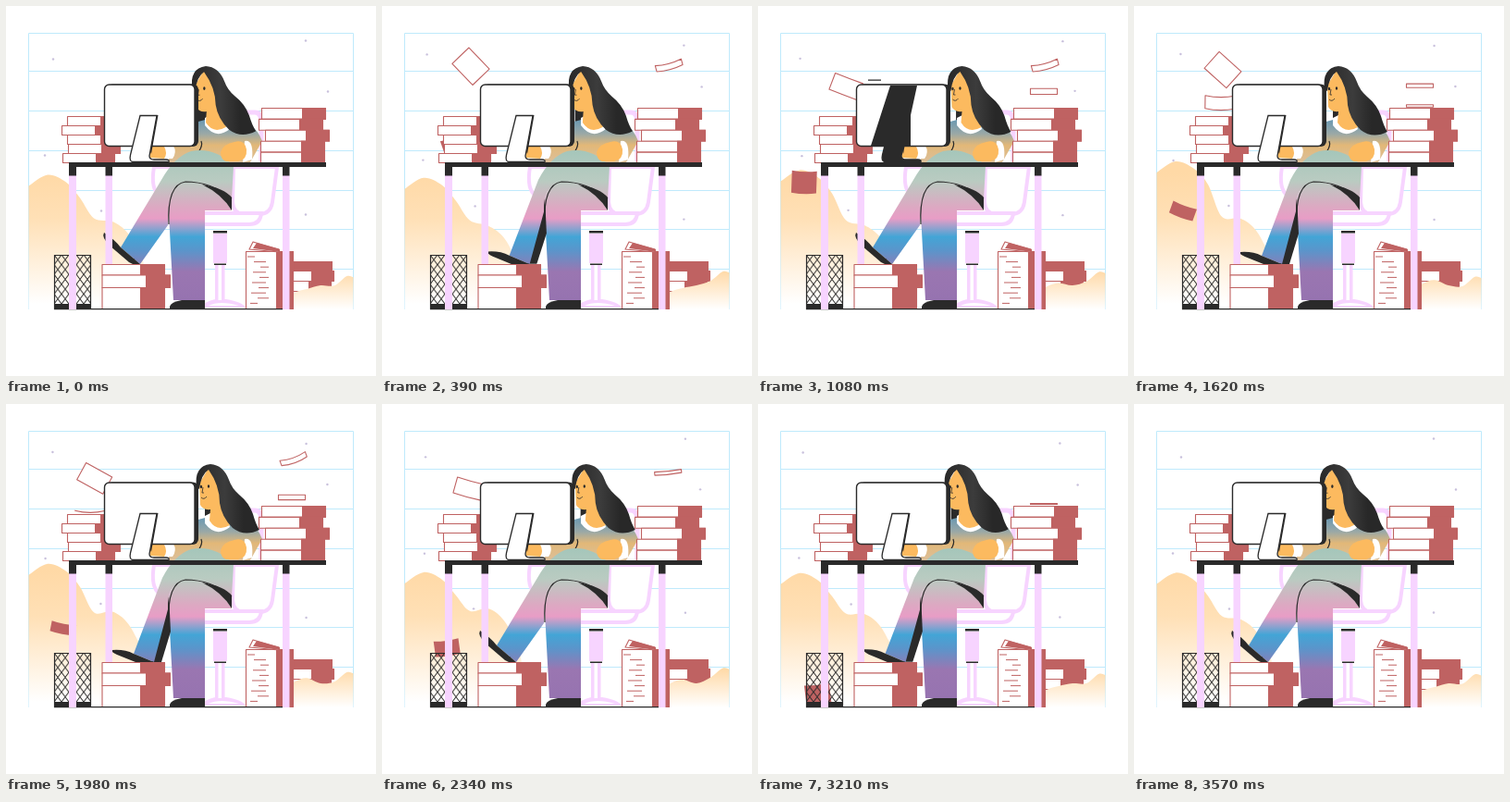
These frames come from a looping animation (400 by 400 pixels, 3600 ms). An HTML page:

```html
<!DOCTYPE html>
<html lang="en">
<head>
<meta charset="utf-8">
<title>Desk work</title>
<style>
html, body { margin: 0; width: 100%; height: 100%; overflow: hidden; background: #fff; }
svg { display: block; width: 100vw; height: 100vh; }
.line { fill: none; stroke: #bfeafc; }
.ink { fill: #2a2a2a; }
.inkline { fill: none; stroke: #2a2a2a; stroke-width: 1.2; }
.red { fill: #bf6262; }
.sheet { fill: #fff; stroke: #bf6262; stroke-width: 1.1; stroke-linejoin: round; }
.pink { fill: #f7d4ff; }
.tube { fill: #fff; stroke: #f7d4ff; stroke-width: 4; }
.skin { fill: #fcba5f; }
.white { fill: #fff; }
</style>
</head>
<body>
<svg viewBox="0 0 400 400">
  <defs>
    <linearGradient id="sand" gradientUnits="userSpaceOnUse" x1="0" y1="180" x2="0" y2="322">
      <stop offset="0" stop-color="#ffd9a6"/><stop offset=".35" stop-color="#ffe0b6"/><stop offset="1" stop-color="#fff"/>
    </linearGradient>
    <linearGradient id="sand2" gradientUnits="userSpaceOnUse" x1="0" y1="286" x2="0" y2="328">
      <stop offset="0" stop-color="#ffd9a6"/><stop offset="1" stop-color="#fff"/>
    </linearGradient>
    <linearGradient id="jeans" gradientUnits="userSpaceOnUse" x1="0" y1="156" x2="0" y2="320">
      <stop offset="0" stop-color="#a5c6ba"/><stop offset=".2" stop-color="#b9cbc1"/>
      <stop offset=".37" stop-color="#dca9c2"/><stop offset=".45" stop-color="#e89dc6"/>
      <stop offset=".57" stop-color="#43a5d6"/><stop offset=".66" stop-color="#5a95cb"/>
      <stop offset=".8" stop-color="#9a76b1"/><stop offset="1" stop-color="#9673b0"/>
    </linearGradient>
    <linearGradient id="shirt" gradientUnits="userSpaceOnUse" x1="0" y1="122" x2="0" y2="168">
      <stop offset="0" stop-color="#6798b4"/><stop offset=".35" stop-color="#9aa8a6"/>
      <stop offset=".62" stop-color="#e2b878"/><stop offset="1" stop-color="#dcbf98"/>
    </linearGradient>
    <linearGradient id="hair">
      <stop offset="0" stop-color="#282828"/><stop offset=".45" stop-color="#3c3c3c"/><stop offset=".75" stop-color="#282828"/>
    </linearGradient>
    <pattern id="mesh" patternUnits="userSpaceOnUse" x="52" y="269" width="8" height="10.6">
      <path class="inkline" style="stroke-width:1" d="M0 0 8 10.600M8 0 0 10.600"/>
    </pattern>
    <clipPath id="air"><rect width="400" height="326"/></clipPath>
  </defs>

  <path class="line" d="M24.500 328V29.500H375.500V328M24 70.500H376M24 113.500H376M24 156.500H376M24 199.500H376M24 241.500H376M24 284.500H376"/>
  <path id="hillL" fill="url(#sand)"/>
  <g id="dots" fill="#c8c0dc"></g>
  <g id="backBooks"></g>
  <path id="hillR" fill="url(#sand2)"/>
  <g id="papers" clip-path="url(#air)"></g>
  <g id="deskBooks"></g>

  <!-- chair -->
  <path d="M255 115H269Q276 115 276 126V168" fill="none" stroke="#f7d4ff" stroke-width="5"/>
  <path class="tube" d="M160 174Q156 198 166 205L190 206V174Z"/>
  <path class="tube" d="M246 174 245 212Q246 225 257 225H274Q286 225 288 212L293 174Z"/>
  <path class="tube" d="M210 224H276Q275 236 263 236H210Z"/>
  <path class="ink" d="M224 243H239V245.500H224ZM225 278.500H238V280H225Z"/>
  <path class="pink" d="M224 246H239V278H224ZM226 280H236.500V318H226ZM212 326Q213 320 226 317H238Q256 320 259 326Z"/>
  <path class="white" d="M229.500 280H233V318H229.500ZM219 324Q231 318 252 324Z"/>

  <!-- woman -->
  <path id="strand" class="ink" d="M207 96H221V128Q214 132 207 130Z"/>
  <path fill="url(#shirt)" d="M204 126 219 122Q228 140 240 122Q268 122 277 146L264 169H176V151L202 147Z"/>
  <path class="inkline" d="M208 158Q213 151 211 146"/>
  <path class="white" d="M215 121 221 118 240 126 242 133Q227 145 215 129Z"/>
  <g id="head">
    <path class="skin" d="M209 86 219 69 233 90 232 108 242 131Q228 139 220 126L221 114Q213 115 210 109Z"/>
    <path fill="url(#hair)" d="M206 90Q203 67 221 65Q235 66 241 82Q244 91 252 98Q263 107 267 119Q270 130 274 136Q258 144 245 134Q233 122 231 107Q231 88 219 71Q211 76 209 92Z"/>
    <g id="face">
      <ellipse class="ink" cx="211" cy="89.500" rx="1.200" ry="1.800"/>
      <ellipse class="ink" cx="219" cy="89" rx="1.200" ry="1.800"/>
      <path class="inkline" style="stroke-width:.8" d="M213 90 212 96H214M211 101Q214 104 217 100"/>
    </g>
  </g>
  <path class="ink" d="M177 325Q178 320 190 318L215 316V327.500H177Z"/>
  <path fill="url(#jeans)" d="M181 318 176 225Q173 190 196 189Q226 192 244 221H215V318Z"/>
  <path id="under" class="ink"/>
  <path id="shin" fill="url(#jeans)"/>
  <path class="ink" d="M212 193Q236 197 244 207V221Q233 203 212 193Z"/>
  <path class="inkline" d="M176 236Q174 193 194 190Q222 190 244 208"/>
  <path id="shoe" class="ink"/>
  <path class="white" d="M258 146Q268 144 266 166L256 169Z"/>
  <path id="palm" class="skin" d="M232 158Q235 149 247 147Q258 144 260 155Q261 166 251 168H238Q232 166 232 158Z"/>
  <path id="thumb" class="skin" d="M245 140Q248 136 251 140L254 148Q263 146 262 156Q261 166 253 166Q238 167 239 158Q241 150 247 149Z"/>
  <path class="white" d="M172 151H181Q185 158 180 165H172Z"/>
  <path class="skin" d="M153 152H171Q175 159 171 165L156 164Z"/>

  <!-- monitor -->
  <rect class="ink" x="109" y="84.500" width="99" height="67.500" rx="6"/>
  <rect x="106.500" y="85" width="97.500" height="66.500" rx="5" fill="#fff" stroke="#2a2a2a" stroke-width="1.400"/>
  <path class="ink" d="M160 118H164.500L157 160 154 150Z"/>
  <path id="stand" fill="#fff" stroke="#2a2a2a" stroke-width="1.300" d="M145 118.500H163L155 162Q155 166 160 166H173Q177 166 176 168.500H137Q133 168 134.500 161Z"/>
  <path id="shade" class="ink" d="M143 86H172L165 118V151H122ZM119 79.500H133V80.700H119Z"/>

  <g id="frontBooks"></g>

  <!-- bin and desk -->
  <rect x="52" y="269" width="40" height="53" fill="url(#mesh)"/>
  <path class="inkline" d="M52.500 328V269.500H91.500V328"/>
  <path class="ink" d="M52 322H92V328H52ZM52 327H299V328.300H52Z"/>
  <path class="pink" d="M68 183H76V328H68ZM107.500 183H115V279H107.500ZM299 183H306.500V328H299Z"/>
  <path class="ink" d="M68 169H346V174H68ZM68 174H76V183.500H68ZM107.500 174H115V183.500H107.500ZM299 174H306.500V183.500H299Z"/>
</svg>
<script>
const LOOP = 3600;
const NS = 'http://www.w3.org/2000/svg';
const $ = id => document.getElementById(id);

function add(id, tag, attrs) {
  const el = document.createElementNS(NS, tag);
  for (const k in attrs) el.setAttribute(k, attrs[k]);
  return $(id).appendChild(el);
}

// A pile of books: row edges, sideways shift of each row, left side, cover start, right side.
function pile(id, edges, shifts, left, cover, right, slide = 1) {
  shifts.forEach((s, i) => {
    const top = edges[i], bottom = edges[i + 1], l = left + s * slide;
    add(id, 'rect', { class: 'sheet', x: l + .5, y: top + .5, width: right + s - l - 1, height: bottom - top });
    add(id, 'path', { class: 'red', d: `M${cover + s} ${top}H${right + s}V${bottom + .5}H${cover + s}Z` });
  });
}
const even = (top, step) => Array.from({ length: 6 }, (_, i) => top + i * step);
pile('deskBooks', even(119, 10), [1, -5, 1, 2, -4], 65, 101, 122);
pile('frontBooks', even(110, 11.9), [1, -2, 5, 0, 0], 275, 319, 345);
pile('frontBooks', [279, 290.5, 304, 327], [0, 6, 0], 103.5, 145, 172, 0);
pile('backBooks', [286, 297, 308, 320], [3, 0, 3], 309, 327, 352, 0);
add('backBooks', 'rect', { class: 'red', x: 309, y: 276, width: 44, height: 11 });
pile('frontBooks', [265, 327], [0], 259, 292, 311);
add('frontBooks', 'path', { class: 'sheet', d: 'M263 263 267 255 295 263V266Z' });
add('frontBooks', 'path', { class: 'red', d: 'M271 256 296 263V266L267 262Z' });
let dashes = '';
for (let i = 0; i < 10; i++) dashes += `M${261 + i * 7 % 15} ${271 + i * 5.600}h${8 + i * 5 % 9}`;
add('frontBooks', 'path', { d: dashes, stroke: '#bf6262' });

const lerp = (a, b, k) => a + (b - a) * k;
const smooth = k => { k = Math.min(1, Math.max(0, k)); return k * k * (3 - 2 * k); };
// Cosine with the given period in ms, highest at the given time.
const wave = (t, period, peak) => Math.cos(2 * Math.PI * (t - peak) / period);

// Smooth outline through points, closed along the floor.
function hill(pts, endX) {
  const at = i => pts[Math.min(pts.length - 1, Math.max(0, i))];
  let d = `M${pts[0][0]} 328V${pts[0][1]}`;
  for (let i = 0; i < pts.length - 1; i++) {
    const [p, a, b, q] = [at(i - 1), at(i), at(i + 1), at(i + 2)];
    d += `C${a[0] + (b[0] - p[0]) / 6} ${a[1] + (b[1] - p[1]) / 6} ` +
      `${b[0] - (q[0] - a[0]) / 6} ${b[1] - (q[1] - a[1]) / 6} ${b[0]} ${b[1]}`;
  }
  return d + `L${endX} 328Z`;
}

function drawHills(t) {
  const top = 180 - 7 * wave(t, LOOP, 1620) - 5 * wave(t, LOOP / 2, 1620);
  const shelf = 230 + 9 * wave(t, LOOP, 700);
  $('hillL').setAttribute('d', hill([
    [24.5, top + 12], [45, top], [65, top + 8], [80, top + 25], [95, 113 + shelf / 2],
    [115, shelf], [132, shelf + 13], [148, shelf + 42]
  ], 160));
  const dip = 304 + 5 * wave(t, LOOP, 0), peak = 290 + 4 * wave(t, LOOP / 2, 1620);
  $('hillR').setAttribute('d', hill([
    [298, dip + 12], [312, dip + 1], [325, dip - 3], [340, 302], [355, peak + 9], [368, peak - 1], [375.5, peak]
  ], 375.5));
}

const dots = [[48, 54], [327, 41], [345, 89], [45, 165], [100, 218], [327, 229]].map(([x, y], i) => ({
  x, y, i, el: add('dots', 'circle', { r: 1.2 })
}));
function drawDots(t) {
  for (const { x, y, i, el } of dots) {
    el.setAttribute('cx', x + 3 * wave(t, 1800, i * 900));
    el.setAttribute('cy', y + 3.500 * wave(t, 1200, i * 600));
  }
}

// Falling sheets: pose by seconds s from the start of the drop.
const poses = {
  left(s) {
    const out = 1 - smooth((s + .55) / .4);
    const land = smooth((s - 1.2) / .25);
    return {
      on: s > -.5 && s < 1.48, x: 96 + 36 * out - 2.5 * s * s, y: 69 + 31.5 * s + 60 * out,
      w: 32, h: (24 - 9 * s) * (1 - land), tilt: 42 - 37 * s + 13 * land, bend: 4 * smooth(s - .4)
    };
  },
  right(s) {
    return {
      on: s > -.25 && s < 1.25, x: 309 + 4 * Math.max(0, .3 - s), y: Math.min(108, 64 + 41 * s),
      w: 29, h: 6.5 * Math.abs(Math.cos(Math.PI * s / .76)),
      tilt: -15 * Math.max(0, 1 - s / .4), bend: 3 * Math.max(0, 1 - s / .4),
      alpha: smooth((s + .25) / .15)
    };
  },
  bin(s) {
    const t = s * 1000;
    return {
      on: t > 350 && t < 3300, x: 61 + 12 * wave(t, 2800, 2650) + 15 * (1 - smooth((t - 300) / 450)),
      y: 171 + .058 * (t - 750), w: 27, h: 11 + 14 * wave(t, 4000, 900) ** 2,
      tilt: 20 * wave(t, 2300, 1620), bend: 2
    };
  }
};
const papers = [
  ['left', 510], ['left', 1620], ['right', 390], ['right', 1080], ['right', 2100], ['bin', 0]
].map(([kind, start]) => ({
  pose: poses[kind], start, el: add('papers', 'path', { class: kind === 'bin' ? 'red' : 'sheet' })
}));

function drawPaper({ pose, start, el }, t) {
  const { on, x, y, w, h, tilt, bend, alpha = 1 } = pose((t - start) / 1000);
  el.style.display = on ? '' : 'none';
  if (!on) return;
  el.setAttribute('d', `M${-w / 2} ${-h / 2}Q0 ${bend - h / 2} ${w / 2} ${-h / 2}V${h / 2}Q0 ${h / 2 + bend} ${-w / 2} ${h / 2}Z`);
  el.setAttribute('transform', `translate(${x} ${y})rotate(${tilt})`);
  el.style.opacity = alpha;
}

function drawLeg(t) {
  const u = t % 1200 / 1200;
  const k = smooth((u - .1) / .25) - smooth((u - .65) / .25);
  const p = (x0, y0, x1, y1) => `${lerp(x0, x1, k)} ${lerp(y0, y1, k)}`;
  const hemL = p(124, 261, 138, 270), hemR = p(145, 279, 160, 279), toe = p(106, 245, 115, 266);
  $('shin').setAttribute('d', `M246 173Q226 152 200 157Q182 163 ${p(168, 188, 169, 188)}L${hemL}L${hemR}` +
    `L${p(175, 237, 175, 222)}Q174 193 194 190Q224 191 244 209Z`);
  $('under').setAttribute('d', `M176 205L${p(175, 234, 178, 246)}L${p(143, 274, 168, 279)}H${lerp(138, 158, k)}Z`);
  $('shoe').setAttribute('d', `M${toe}Q${p(118, 253, 128, 265)} ${hemL}L${hemR}` +
    `Q${p(139, 281, 149, 281)} ${p(133, 277, 140, 279)}L${p(112, 259, 120, 271)}Q${p(103, 250, 113, 268)} ${toe}Z`);
}

function drawWoman(t) {
  const cheer = smooth((t - 2550) / 200) - smooth((t - 3050) / 200);
  const lean = ((1 + wave(t, LOOP, 0)) / 2) ** 2;
  $('head').setAttribute('transform', `translate(${-4 * lean - 2 * cheer})rotate(${-lean} 226 125)`);
  $('face').setAttribute('transform', `translate(${6 * cheer})`);
  $('strand').setAttribute('transform', `translate(${8 * (1 - lean)})`);
  $('thumb').style.display = cheer > .5 ? '' : 'none';
  $('palm').style.display = cheer > .5 ? 'none' : '';
}

function draw(t) {
  drawHills(t);
  drawDots(t);
  papers.forEach(p => drawPaper(p, t));
  drawLeg(t);
  drawWoman(t);
  const dark = t >= 1050 && t < 1110;
  $('shade').style.display = dark ? '' : 'none';
  $('stand').setAttribute('fill', dark ? '#2a2a2a' : '#fff');
}

const begin = performance.now();
function tick() {
  draw((performance.now() - begin) % LOOP);
  requestAnimationFrame(tick);
}
draw(0);
requestAnimationFrame(tick);
</script>
</body>
</html>
```
